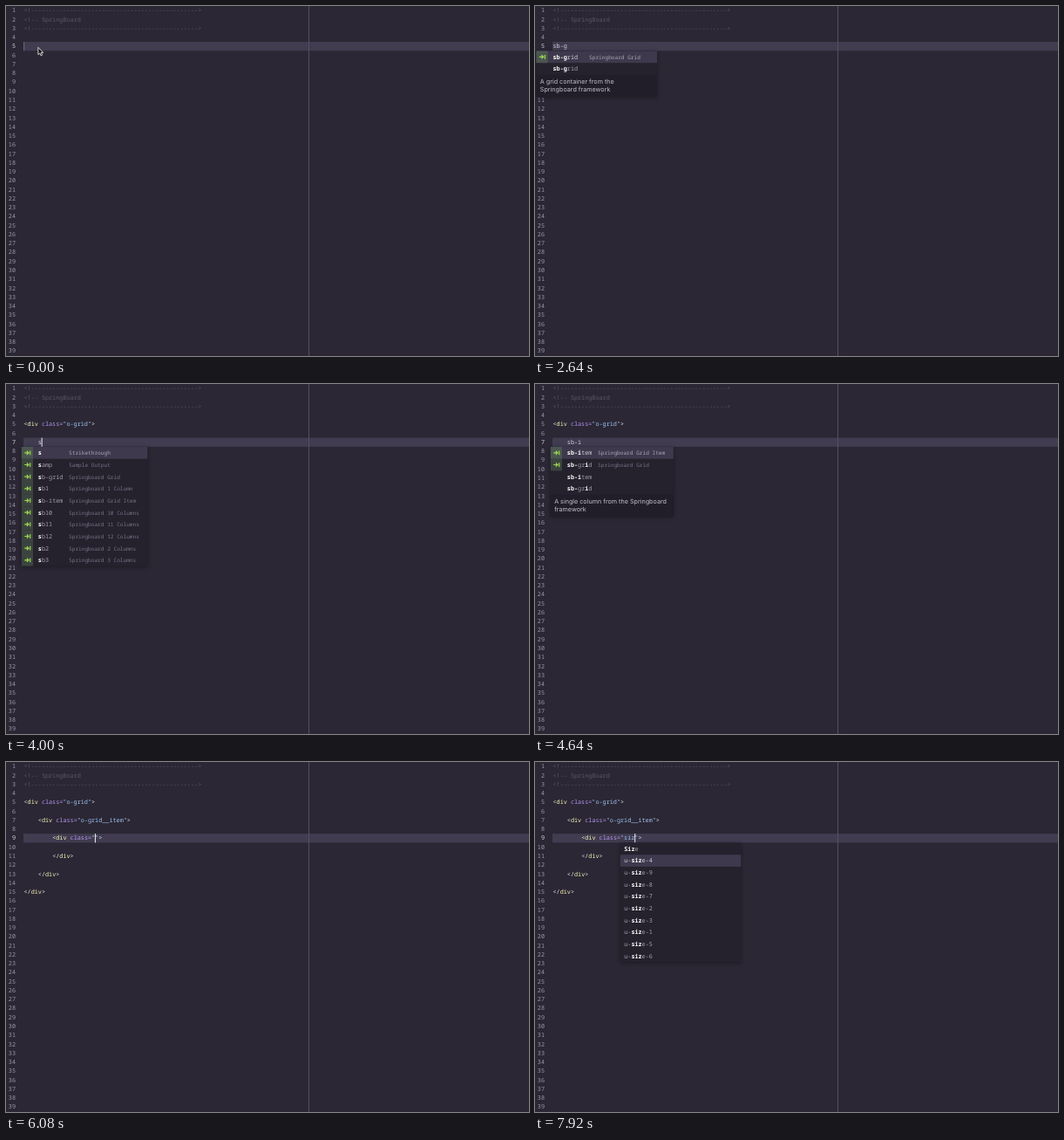
Write an HTML page that moves like this. It is 600x401 px and loops after 8000 ms.

```html
<!DOCTYPE html>
<html lang="en">
<head>
<meta charset="utf-8">
<title>Editor snippets</title>
<style>
html, body { margin: 0; width: 100%; height: 100%; overflow: hidden; background: #2b2734; }
svg { display: block; width: 600px; height: 401px; }
text { font: 6.81px "Noto Sans Mono", "DejaVu Sans Mono", monospace; white-space: pre; text-rendering: geometricPrecision; fill: #d9d5e6; }
.num { fill: #9d99a8; text-anchor: end; }
.num.on { fill: #d6d3de; }
.rem { fill: #5d586b; }
.pun { fill: #e6f1f5; }
.tag { fill: #f7f4b8; }
.att { fill: #b696f2; }
.str { fill: #a0c4f5; }
.lab { fill: #a5a1b1; }
.hit { fill: #fff; font-weight: 700; }
text.hint { font-size: 6.13px; fill: #777285; }
.sel .lab { fill: #d2cedd; }
.sel text.hint { fill: #aaa6b6; }
text.desc { font: 7.2px Inter, "Liberation Sans", sans-serif; fill: #c3bfcd; }
.box { filter: drop-shadow(0 1px 2px rgba(0, 0, 0, .35)); }
</style>
</head>
<body>
<svg viewBox="0 0 600 401">
  <g id="page"></g>
  <rect x="347" width="1" height="401" fill="#55505f"/>
  <rect id="caret" width="1" height="10.3" fill="#f2f0f7"/>
  <g id="menu"></g>
  <path id="mouse" d="M36.9 47.4v8.3l1.9-1.7 1.3 2.9 1.5-.7-1.3-2.8h2.4z" fill="#111" stroke="#fff" stroke-width=".8"/>
</svg>
<script>
const LOOP = 8000, LINE = 10.263, CHAR = 4.086, LEFT = 20.5, ROW = 13.66;
const $ = id => document.getElementById(id);
const esc = s => s.replace(/&/g, "&amp;").replace(/</g, "&lt;").replace(/>/g, "&gt;");
const span = (cls, s) => `<tspan class="${cls}">${esc(s)}</tspan>`;
const text = (x, y, cls, body) => `<text x="${x}" y="${y}" class="${cls}">${body}</text>`;
const rect = (x, y, w, h, fill, more = "") => `<rect x="${x}" y="${y}" width="${w}" height="${h}" fill="${fill}" ${more}/>`;
const lineY = n => (n - 1) * LINE;
const colX = c => LEFT + c * CHAR;

// Documents: [line, indent, code]
const rule = "<!" + "-".repeat(47) + ">";
const grid = [5, 0, '<div class="o-grid">'];
const item = [7, 4, '<div class="o-grid__item">'];
const end = (line, indent) => [line, indent, "</div>"];
const inner = cls => [grid, item, [9, 8, `<div class="${cls}">`], end(11, 8), end(13, 4), end(15, 0)];
const outer = [grid, end(9, 0)];
const nested = [grid, item, end(11, 4), end(13, 0)];

// Completion entries: [label, hint]
const sbGrid = ["sb-grid", "Springboard Grid"];
const sbItem = ["sb-item", "Springboard Grid Item"];
const cols = (...ns) => ns.map(n => ["sb" + n, `Springboard ${n} Column${n > 1 ? "s" : ""}`]);
const gridNote = ["A grid container from the", "Springboard framework"];
const itemNote = ["A single column from the Springboard", "framework"];
const menus = {
  s: { rows: [["s", "Strikethrough"], ["samp", "Sample Output"], sbGrid, ...cols(1), sbItem, ...cols(10, 11, 12, 2, 3)], w: 144.5 },
  sb: { rows: [sbGrid, ...cols(1), sbItem, ...cols(10, 11, 12, 2, 3, 4, 5)], w: 144.5, note: gridNote },
  dash: { rows: [sbGrid, sbItem, ["sb-grid"], ["sb-item"]], w: 141, note: gridNote },
  g: { rows: [sbGrid, ["sb-grid"]], w: 138.5, gap: 13, note: gridNote },
  i: { rows: [sbItem, sbGrid, ["sb-item"], ["sb-grid"]], w: 141, note: itemNote },
  d: { rows: [["dd", "Description"], ["del", "Deleted Text"], ["details", "Details"], ["dfn", "Definition"], ["dialog", "Dialog"],
    ["dir", "Directory"], ["div", "Division"], ["dl", "Description List"], ["dt", "Term"], ["data", "Data"]], w: 138.5 },
  di: { rows: [["div", "Division"], ["dir", "Directory"], ["dialog", "Dialog"]], w: 138.5 },
  div: { rows: [["div", "Division"]], w: 138.5 },
  size: { rows: [["Size"], ...[4, 9, 8, 7, 2, 3, 1, 5, 6].map(n => ["u-size-" + n])], w: 138.5, bare: true }
};

// Steps: start, document, current line, indent, typed, menu, chosen row, caret phase start
const steps = [
  [0, [], 5, 0, "", "", 0, -300],
  [1840, [], 5, 0, "s", "s"],
  [1920, [], 5, 0, "sb", "sb"],
  [2080, [], 5, 0, "sb-", "dash"],
  [2160, [], 5, 0, "sb-g", "g"],
  [2800, outer, 7, 4, ""],
  [3520, outer, 7, 4, ""],
  [4000, outer, 7, 4, "s", "s"],
  [4160, outer, 7, 4, "sb", "sb"],
  [4400, outer, 7, 4, "sb-", "dash"],
  [4480, outer, 7, 4, "sb-i", "i", 0, 4160],
  [4800, nested, 9, 8, ""],
  [5440, nested, 9, 8, "d", "d"],
  [5600, nested, 9, 8, "di", "di"],
  [5760, nested, 9, 8, "div", "div"],
  [6000, inner(""), 9, 20, ""],
  [7040, inner("s"), 9, 20, "s", "size"],
  [7200, inner("si"), 9, 20, "si", "size"],
  [7360, inner("siz"), 9, 20, "siz", "size"],
  [7840, inner("siz"), 9, 20, "siz", "size", 1]
];

function paint(code) {
  return code.replace(/"[^"]*"|<\/?|>|div|class|=/g, s => {
    const cls = s === "div" ? "tag" : /^(class|=)$/.test(s) ? "att" : s[0] === '"' ? "str" : "pun";
    return span(cls, s);
  });
}

// Marks the typed letters inside a label
function match(label, typed) {
  let k = 0;
  return [...label].map(c => {
    const hit = k < typed.length && c.toLowerCase() === typed[k];
    if (hit) k++;
    return span(hit ? "hit" : "lab", c);
  }).join("");
}

function drawPage(doc, line, indent, typed) {
  const put = (n, col, body, cls = "") => text(colX(col), lineY(n) + 7.35, cls, body);
  let out = rect(20, lineY(line), 580, LINE, "#413c50");
  for (let n = 1; n <= 39; n++) out += text(11, lineY(n) + 7.35, n === line ? "num on" : "num", n);
  [rule, "<!-- SpringBoard", rule].forEach((s, i) => out += put(i + 1, 0, esc(s), "rem"));
  for (const [n, col, code] of doc) out += put(n, col, paint(code));
  if (indent < 20) out += put(line, indent, esc(typed));
  return out;
}

function drawMenu(key, line, indent, typed, chosen) {
  if (!key) return "";
  const { rows, w, note, bare, gap = 6.6 } = menus[key];
  const x = colX(indent), left = x - (bare ? 4.5 : 19), y0 = lineY(line + 1) + .2;
  const h = rows.length * ROW;
  const hintX = x + gap + CHAR * Math.max(...rows.map(r => r[0].length));
  let out = rect(left, y0, w, h + (note ? 25 : 0), "#25212d", 'class="box"');
  rows.forEach(([label, hint], i) => {
    const y = y0 + i * ROW, on = i === chosen, base = y + ROW / 2 + 2.35;
    out += `<g class="${on ? "sel" : ""}">`;
    if (on) out += rect(left, y, w, ROW, "#3e394c");
    if (hint) {
      out += rect(left, y, 13.2, ROW, on ? "#4b5650" : "#3b443f");
      out += `<path transform="translate(${left + 3.4} ${y + ROW / 2})" d="M0 0H4.6M2.6-2.1 4.8 0 2.6 2.1M6.5-2.4V2.4" fill="none" stroke="#a0dc50" stroke-width="1.15"/>`;
      out += text(hintX, base, "hint", esc(hint));
    }
    out += text(x, base, "", match(label, typed)) + "</g>";
  });
  if (note) {
    out += rect(left, y0 + h, w, 25, "#211d29");
    note.forEach((s, i) => out += text(left + 4.3, y0 + h + 10 + i * 9.2, "desc", esc(s)));
  }
  return out;
}

let shown = -1;
function show(i) {
  const [, doc, line, indent, typed, key, chosen = 0] = steps[i];
  $("page").innerHTML = drawPage(doc, line, indent, typed);
  $("menu").innerHTML = drawMenu(key, line, indent, typed, chosen);
  $("caret").setAttribute("x", colX(indent + typed.length) - .3);
  $("caret").setAttribute("y", lineY(line));
  shown = i;
}

const begun = performance.now();
function tick() {
  const t = (performance.now() - begun) % LOOP;
  let i = steps.length - 1;
  while (i > 0 && steps[i][0] > t) i--;
  if (i !== shown) show(i);
  const since = t - (steps[i][7] ?? steps[i][0]);
  const glow = .5 + .75 * Math.cos(since / 1000 * 2 * Math.PI);
  $("caret").setAttribute("opacity", Math.min(1, Math.max(0, glow)));
  $("mouse").setAttribute("visibility", t < 1680 ? "visible" : "hidden");
  requestAnimationFrame(tick);
}
tick();
</script>
</body>
</html>
```
